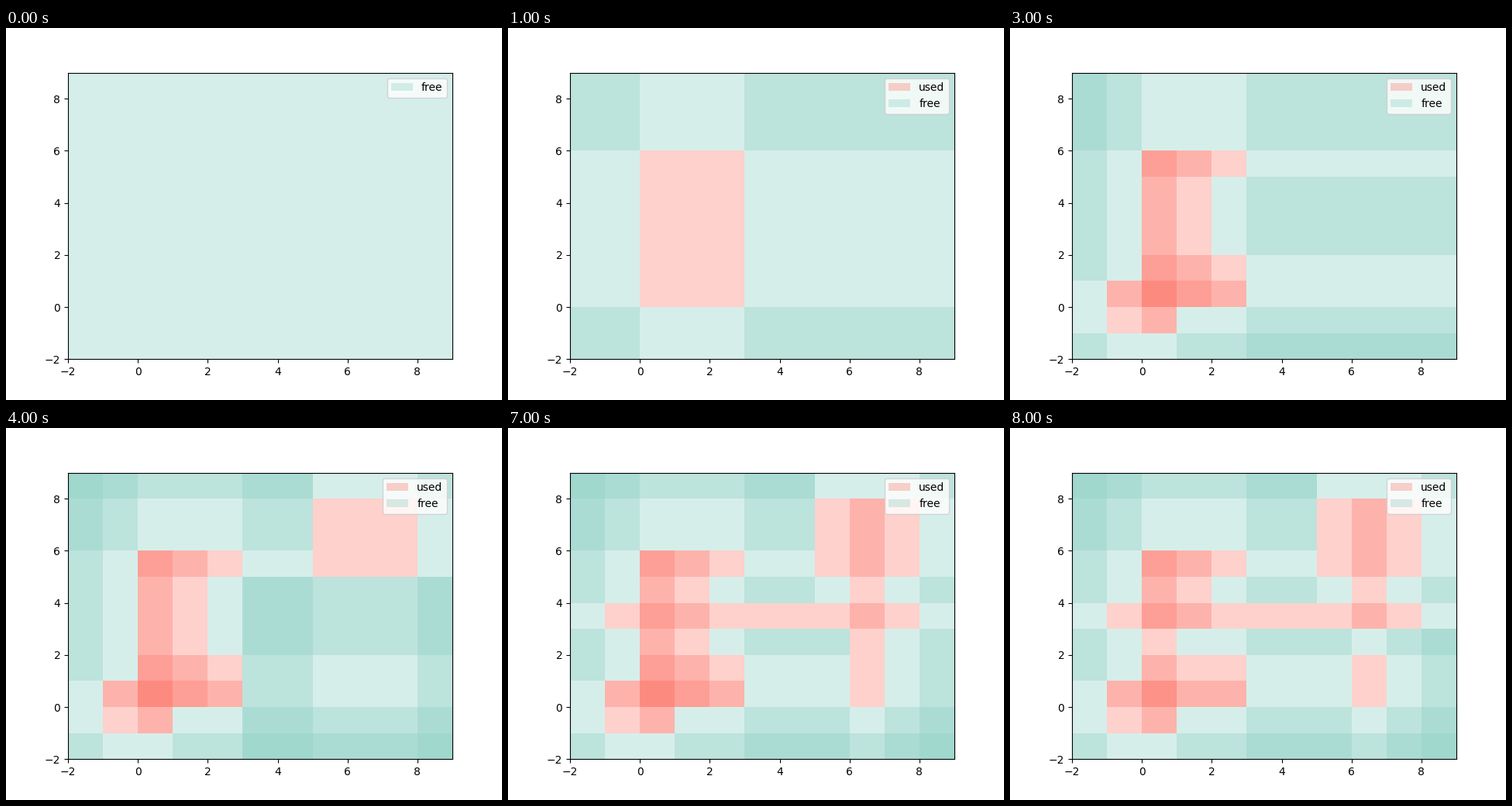
A matplotlib script that plays this animation: 640x480 px, repeating every 9 s.

```python
import numpy as np
import matplotlib.pyplot as plt
from matplotlib.animation import FuncAnimation
from matplotlib.patches import Patch, Rectangle

LO, HI = -2, 9
SIZE = HI - LO
ALPHA = 0.35
USED, FREE = "#fd7c6f", "#8cd1c4"

# One change per second: (becomes used, x0, y0, x1, y1); None is a pause.
STEPS = [
    None,
    (True, 0, 0, 3, 6),
    (False, 2, 2, 3, 5),
    (True, -1, -1, 1, 1),
    (True, 5, 5, 8, 8),
    None,
    (True, 6, 0, 7, 8),
    (True, -1, 3, 8, 4),
    (False, 1, 2, 7, 3),
]


def maximal_rects(mask):
    """All filled rectangles that cannot grow in any direction."""
    total = np.zeros((SIZE + 1, SIZE + 1), int)
    total[1:, 1:] = mask.cumsum(0).cumsum(1)

    def full(x0, y0, x1, y1):
        if min(x0, y0) < 0 or max(x1, y1) > SIZE:
            return False
        count = total[x1, y1] - total[x0, y1] - total[x1, y0] + total[x0, y0]
        return count == (x1 - x0) * (y1 - y0)

    spans = [(a, b) for a in range(SIZE) for b in range(a + 1, SIZE + 1)]
    rects = []
    for x0, x1 in spans:
        for y0, y1 in spans:
            if full(x0, y0, x1, y1) and not (
                full(x0 - 1, y0, x1, y1) or full(x0, y0 - 1, x1, y1)
                or full(x0, y0, x1 + 1, y1) or full(x0, y0, x1, y1 + 1)
            ):
                rects.append((x0 + LO, y0 + LO, x1 - x0, y1 - y0))
    return rects


def build_states():
    used = np.zeros((SIZE, SIZE), bool)
    states = []
    for step in STEPS:
        if step:
            value, x0, y0, x1, y1 = step
            used[x0 - LO:x1 - LO, y0 - LO:y1 - LO] = value
        states.append((maximal_rects(used), maximal_rects(~used)))
    return states


states = build_states()
fig, ax = plt.subplots(figsize=(6.4, 4.8), dpi=100)
ax.set_xlim(LO, HI)
ax.set_ylim(LO, HI)


def draw(i):
    for patch in list(ax.patches):
        patch.remove()
    handles = []
    for rects, color, label in zip(states[i], (USED, FREE), ("used", "free")):
        style = dict(facecolor=color, edgecolor="none", linewidth=0, alpha=ALPHA)
        for x, y, w, h in rects:
            ax.add_patch(Rectangle((x, y), w, h, **style))
        if rects:
            handles.append(Patch(label=label, **style))
    ax.legend(handles=handles, loc="upper right")
    return []


anim = FuncAnimation(fig, draw, frames=len(STEPS), interval=1000,
                     repeat=True, repeat_delay=0)
plt.show()
```
